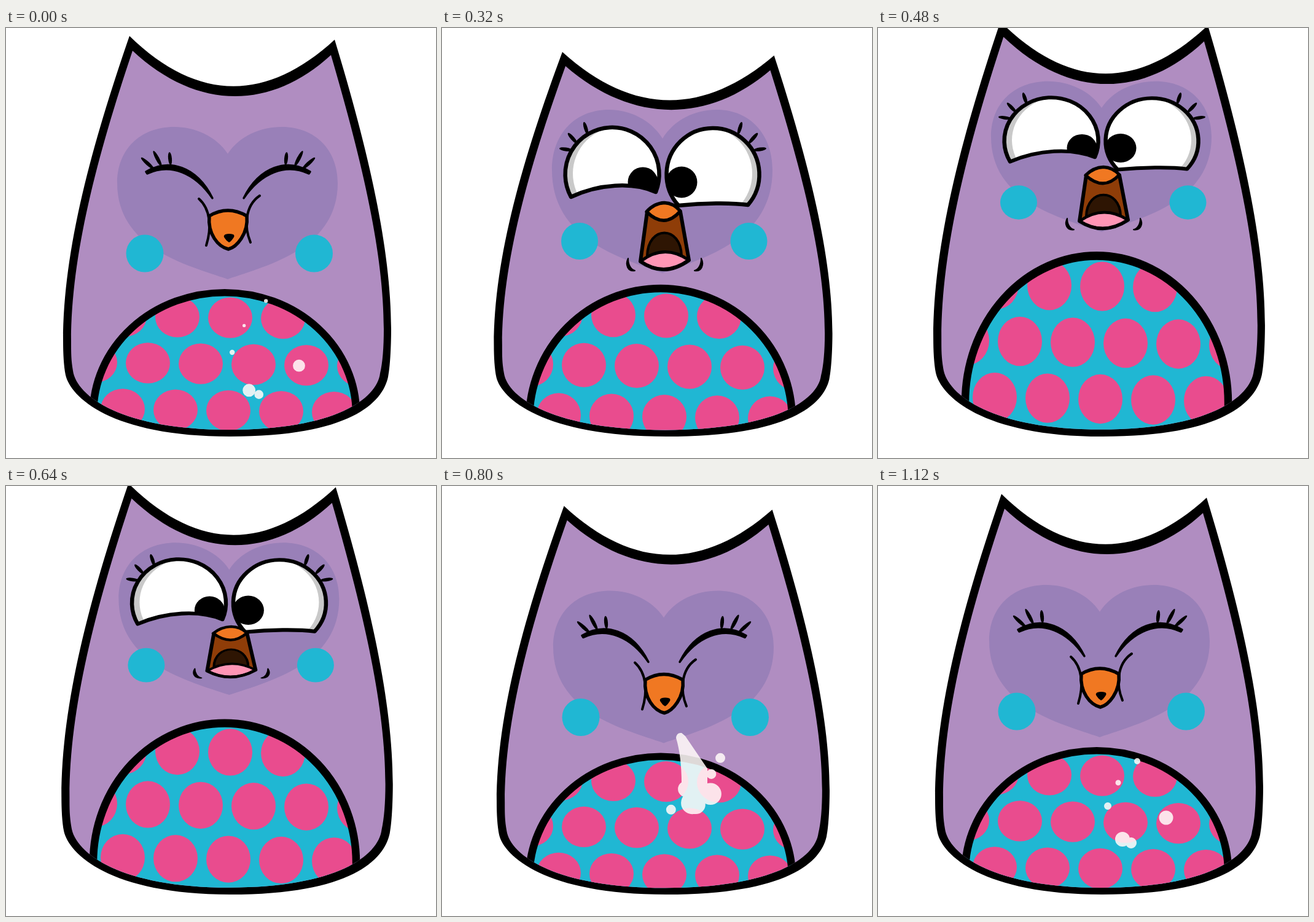
These frames come from a looping animation (700x700 px, 1.2 s). An HTML page with a canvas:

```html
<!DOCTYPE html>
<html lang="en">
<head>
<meta charset="utf-8">
<title>Sneezing owl</title>
<style>
html, body { margin: 0; width: 100%; height: 100%; overflow: hidden; background: #fff; }
canvas { display: block; width: 700px; height: 700px; }
</style>
</head>
<body>
<canvas id="stage" width="700" height="700"></canvas>
<script>
const ctx = document.getElementById('stage').getContext('2d');
const STEP = 80, STEPS = 15;
const BODY = '#b08dc1', HEART = '#9980b8', CYAN = '#20b7d3', PINK = '#e94c8e', ORANGE = '#f07822';

const path = d => new Path2D(d);
const OUTER = path('M201 13C312 121 424 121 535 19C590 200 627 360 627 490C627 510 626 548 622 568C613 610 560 665 365 665C170 665 105 600 97 565C94 550 93 530 93 510C93 360 140 190 201 13Z');
const INNER = path('M206 37C310 134 430 135 529 44C582 225 615 370 615 490C615 520 613 545 609 562C604 604 535 654 363 654C190 654 115 600 109 558C106 540 106 530 106 510C106 370 148 210 206 37Z');
const BELLY = path('M142 740V628A214 214 0 0 1 570 628V740Z');
const HEART_SHAPE = path('M359 171C340 140 305 124 272 124C215 124 179 165 179 222C179 335 290 365 359 390C428 365 538 335 538 222C538 165 502 124 447 124C412 124 378 140 359 171Z');
const LEFT_EYE = path('M210 266A76.5 76.5 0 1 1 348 258C310 241 255 245 210 266Z');
const RIGHT_EYE = path('M385 280A75.5 75.5 0 1 1 498 279C470 275 425 276 385 280Z');

const ramp = (t, from, to) => Math.min(1, Math.max(0, (t - from) / (to - from)));

function fill(shape, color) {
  ctx.fillStyle = color;
  ctx.fill(shape);
}

function line(shape, width) {
  ctx.lineWidth = width;
  ctx.stroke(shape);
}

function ball(x, y, r, color) {
  const shape = new Path2D();
  shape.arc(x, y, r, 0, 7);
  fill(shape, color);
}

function lash(x1, y1, x2, y2) {
  const shape = new Path2D();
  shape.ellipse((x1 + x2) / 2, (y1 + y2) / 2, Math.hypot(x2 - x1, y2 - y1) / 2, 3,
    Math.atan2(y2 - y1, x2 - x1), 0, 7);
  fill(shape, '#000');
}

// Run draw() with the point (x0, y0) moved to (x, y) and scaled around it
function placed(x0, y0, x, y, sx, sy, draw) {
  ctx.save();
  ctx.translate(x, y);
  ctx.scale(sx, sy);
  ctx.translate(-x0, -y0);
  draw();
  ctx.restore();
}

function mirrored(axis, draw) {
  draw();
  placed(axis, 0, axis, 0, -1, 1, draw);
}

// Inhale: crouch, stretch up, then begin to shut the beak
function inhalePose(step) {
  const up = ramp(step, 4, 6), shut = ramp(step, 6, 8);
  const crouch = ramp(step, 0, 4) ** 2 * (1 - up) + .13 * shut;
  const rise = up - .12 * shut;
  const faceY = 335 + 12 * crouch - 51 * rise;
  const faceS = 1 - .078 * rise;
  return {
    sx: 1 + .032 * crouch ** 2 + .011 * rise,
    sy: 1 - .04 * crouch + .036 * rise,
    bellyY: 619 + 13 * crouch - 16 * rise,
    bellyS: 1 + .116 * rise - .042 * shut,
    dx: 5 * rise, faceY, faceS,
    beakY: faceY - 66 * faceS - 4 * shut,
    beakS: faceS - .175 * shut
  };
}

// Sneeze: squashed by the blast, then settling back
function sneezePose(step) {
  const squash = step < 10 ? .5 : 1 - ramp(step, 10, 14);
  return {
    sx: 1 + .015 * squash,
    sy: 1 - .03 * squash,
    bellyY: 622 + 9.5 * squash,
    bellyS: .92,
    faceY: 9.5 * squash
  };
}

function drawBelly() {
  ctx.save();
  ctx.clip(BELLY);
  fill(BELLY, CYAN);
  for (let row = 0; row < 4; row++) {
    for (let col = 0; col < 6; col++) {
      const x = 145 + 86 * col + (row % 2 ? 0 : 48) - (row === 2 ? 89 : 0);
      ball(x, 456 + 81.500 * row + 1.3 * col, 36, PINK);
    }
  }
  ctx.restore();
  line(BELLY, 12.5);
}

function openEye(shape, shineX, pupilX, pupilR) {
  ctx.save();
  ctx.clip(shape);
  fill(shape, '#c9c9c9');
  ball(shineX, 228, 76, '#fff');
  ball(pupilX, 242, pupilR, '#000');
  ctx.restore();
  line(shape, 6.5);
}

function openLashes() {
  lash(231, 144, 237, 164);
  lash(205, 162, 220, 179);
  lash(191, 187, 212, 190);
}

function drawOpenFace() {
  fill(HEART_SHAPE, HEART);
  ball(224, 338, 30, CYAN);
  ball(499.5, 338, 30, CYAN);
  openEye(LEFT_EYE, 289, 327, 24.5);
  openEye(RIGHT_EYE, 429, 390, 25.5);
  mirrored(359.5, openLashes);
}

function drawOpenBeak() {
  const mouth = path('M334 290L323 371Q362 398 402 369L388 290Z');
  const throat = path('M334 362C335 312 389 312 390 362Z');
  const tongue = path('M323 371Q362 341 402 369Q362 398 323 371Z');
  const top = path('M333 290Q346 276 362 275.5Q377 276 388 289Q362 319 333 290Z');
  fill(mouth, '#8f3d08');
  fill(throat, '#2e1503');
  line(throat, 4);
  fill(tongue, '#ff95b5');
  line(tongue, 5);
  line(mouth, 6);
  fill(top, ORANGE);
  line(top, 5.5);
  mirrored(362.5, () => {
    const dimple = path('M303 366C298 376 302 388 314 386C307 384 303 376 303 366Z');
    fill(dimple, '#000');
    line(dimple, 2);
  });
}

function closedEye() {
  const lid = path('M228 234C265 212 310 225 336 277C308 236 268 219 230 237Z');
  fill(lid, '#000');
  line(lid, 3.5);
  lash(220, 211, 241, 230);
  lash(240, 200, 253, 225);
  lash(266, 202, 268, 223);
}

function drawClosedFace() {
  placed(359, 124, 361, 161, 1, .932, () => fill(HEART_SHAPE, HEART));
  ball(226, 367, 30.5, CYAN);
  ball(501.5, 367, 30.5, CYAN);
  mirrored(361.5, closedEye);
  const beak = path('M331 306Q361 288 392 306C395 335 375 357 362 360C345 356 328 335 331 306Z');
  fill(beak, ORANGE);
  line(beak, 5.5);
  line(path('M314 278C333 295 335 325 326 354'), 4);
  line(path('M413 273C388 290 388 325 398 349'), 4);
  fill(path('M357 336Q363 334 370 336Q373 338 370 342Q366 348 363 349Q359 347 356 342Q353 338 357 336Z'), '#000');
}

// Droplets fly out from a sinking centre and shrink
function drawPuff(step) {
  const k = Math.max(0, (step - 10) / 4);
  const shape = new Path2D();
  const drop = (dx, dy, size) => {
    const spread = .42 + .58 * k;
    const x = 414 + dx * spread, y = 492 + 26 * k + dy * spread;
    const r = Math.max(0, 8 + .85 * size + (.15 * size - 8) * k);
    shape.moveTo(x + r, y);
    shape.arc(x, y, r, 0, 2 * Math.PI);
  };
  drop(55, 22, 11.5);
  drop(-16, 57, 12);
  drop(-2, 63, 9);
  drop(-40, 3, 6);
  drop(-23, -35, 4.5);
  drop(8, -70, 5);
  drop(58, -55, 0);
  drop(-98, 83, 0);
  drop(93, -117, 0);
  if (step <= 10) shape.addPath(path('M381 410Q382 401 390 402L396 407L432 460V515H400L390 485Q390 440 381 410Z'));
  fill(shape, 'rgba(255,250,248,.87)');
}

function draw(frame) {
  const step = frame || STEPS;
  const sneezing = step >= 9;
  const p = sneezing ? sneezePose(step) : inhalePose(step);
  ctx.fillStyle = '#fff';
  ctx.fillRect(0, 0, 700, 700);
  ctx.strokeStyle = '#000';
  ctx.lineCap = ctx.lineJoin = 'round';

  ctx.save();
  placed(360, 665, 360, 665, p.sx, p.sy, () => {
    fill(OUTER, '#000');
    fill(INNER, BODY);
  });
  const clip = new Path2D();
  clip.addPath(INNER, new DOMMatrix([p.sx, 0, 0, p.sy, 360 * (1 - p.sx), 665 * (1 - p.sy)]));
  ctx.clip(clip);
  placed(0, 622, 0, p.bellyY, 1, p.bellyS, drawBelly);
  ctx.restore();

  if (sneezing) {
    placed(0, 0, 0, p.faceY, 1, 1, drawClosedFace);
    const size = step < 10 ? .45 : 1;
    placed(360, 350, 360, 350, size, size, () => drawPuff(step));
  } else {
    placed(0, 338, p.dx, p.faceY, 1, p.faceS, drawOpenFace);
    placed(0, 272, p.dx, p.beakY, 1, p.beakS, drawOpenBeak);
  }
}

const start = performance.now();
function tick() {
  draw(Math.floor((performance.now() - start) / STEP) % STEPS);
  requestAnimationFrame(tick);
}
tick();
</script>
</body>
</html>
```
